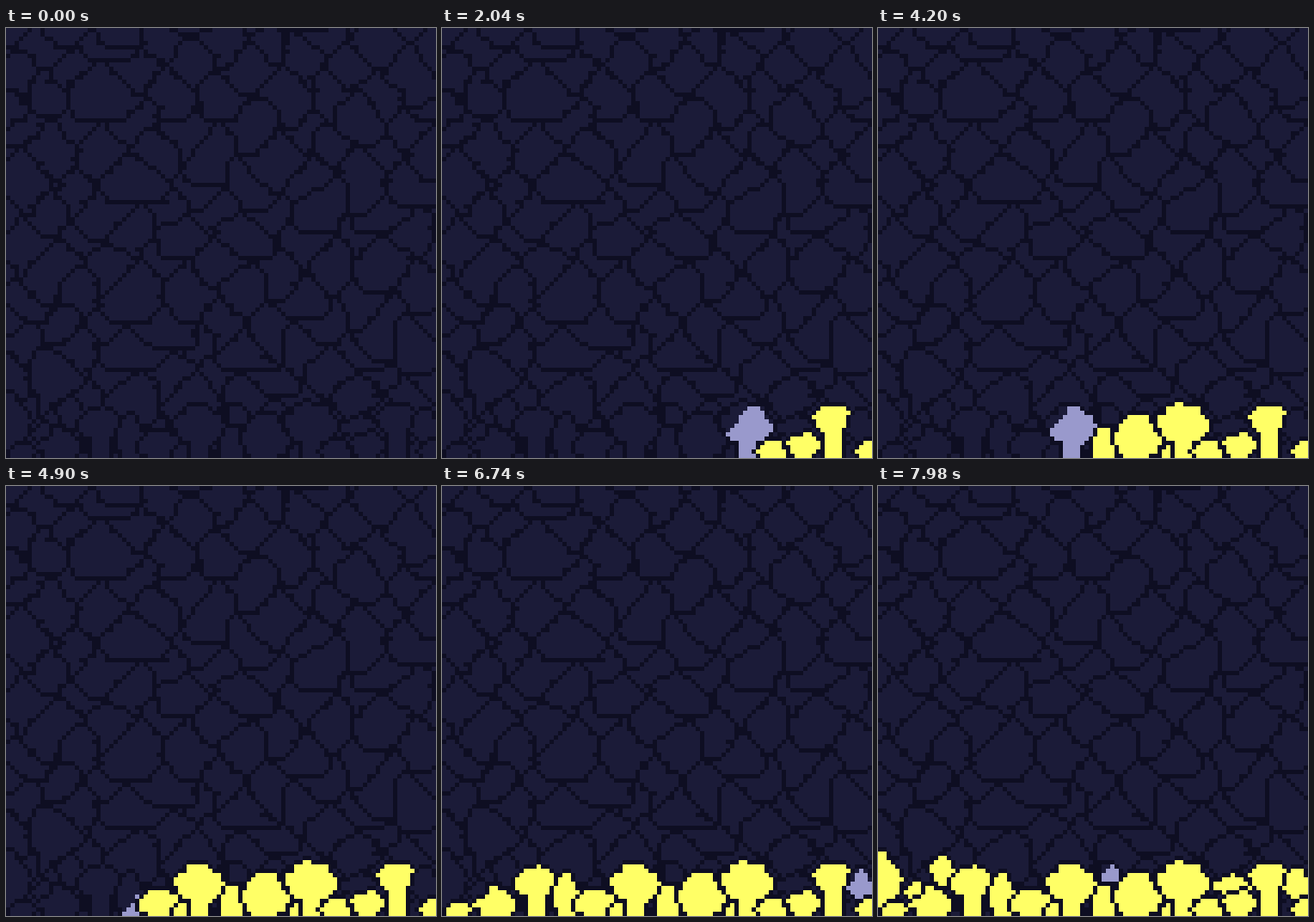
Recreate the animation shown at these times as an HTML page with a canvas. Size 500 by 500 pixels, loop 8 s.

```html
<!DOCTYPE html>
<html lang="en">
<head>
<meta charset="utf-8">
<title>Cave flood fill</title>
<style>
  html, body { margin: 0; width: 100%; height: 100%; overflow: hidden; background: #1b1b38; }
  canvas { display: block; width: 100%; height: 100%; image-rendering: pixelated; }
</style>
</head>
<body>
<canvas id="stage" width="100" height="100"></canvas>
<script>
const SIZE = 100, STEP = 20, LOOP = 8000;
const FLOOR = '#1b1b38', WALL = '#0e0e22', ACTIVE = '#9999cc', DONE = '#ffff66';

// Chambers as rounded diamonds in fill order: middle x, y and half width, half height.
const rooted = [ // these stand on the bottom edge
  [99, 98.5, 2.5, 2.5], [90.8, 91.2, 5, 3.8], [84, 97, 4, 3.2], [77, 98.5, 4, 2.7],
  [70.8, 92, 6.5, 4.9], [68, 99, 2, 2], [60.5, 95.3, 5.7, 5.5], [52.5, 96.5, 2.3, 4],
  [45, 92.7, 6, 4.9], [41, 98.5, 2.2, 2], [35.5, 97, 4.8, 3.6], [28.8, 94.8, 3, 5],
  [21.8, 92.3, 5.2, 4], [12.5, 97, 4.9, 4], [4, 98.6, 3.2, 2]
];
const hanging = [
  [97.3, 92.7, 3, 4], [82.5, 93, 4.5, 2.5], [0, 92, 5.5, 7],
  [9.3, 94.5, 2.8, 2.2], [15, 89.5, 2.7, 3.7], [54, 90, 2.5, 2.3]
];
const STEM = 2.2;

let seed = 7;
const random = () => {
  seed = (Math.imul(seed, 1664525) + 1013904223) >>> 0;
  return seed / 4294967296;
};
const spread = amount => (random() - 0.5) * 2 * amount;

function makeCanvas() {
  const canvas = document.createElement('canvas');
  canvas.width = canvas.height = SIZE;
  return canvas.getContext('2d');
}
const ctx = document.getElementById('stage').getContext('2d');
const rock = makeCanvas();
const paint = (target, color, x, y) => {
  target.fillStyle = color;
  target.fillRect(x, y, 1, 1);
};

// Cracks run diagonally between the shaken nodes of a diamond lattice.
function crack([x, y], [endX, endY]) {
  while (x !== endX || y !== endY) {
    paint(rock, WALL, x, y);
    if (random() < 0.2) paint(rock, WALL, x + (random() < 0.5 ? 1 : -1), y);
    const sidestep = random();
    if (sidestep > 0.12 || y === endY) x += Math.sign(endX - x);
    if (sidestep < 0.88 || x === endX) y += Math.sign(endY - y);
  }
}

function drawCracks() {
  const gap = 6.5, count = 18;
  const nodes = Array.from({ length: count }, (_, row) =>
    Array.from({ length: count }, (_, col) => [
      Math.round((col - 0.5) * gap + spread(2.8)),
      Math.round((row - 0.5) * gap + spread(2.8))
    ]));
  for (let row = 0; row < count - 1; row++) {
    for (let col = row % 2; col < count; col += 2) {
      for (const side of [-1, 1]) {
        const next = nodes[row + 1][col + side];
        if (next) crack(nodes[row][col], next);
      }
    }
  }
}

function findOwner(x, y) {
  const ragged = 1 + spread(0.1);
  let owner = -1, best = ragged;
  [...rooted, ...hanging].forEach(([cx, cy, rx, ry], i) => {
    const dx = Math.abs(x + 0.5 - cx), dy = Math.abs(y + 0.5 - cy);
    const onStem = i < rooted.length && y > cy && dx < STEM;
    const depth = onStem ? 0.9 * dx / STEM : (dx / rx) ** 1.5 + (dy / ry) ** 1.5;
    if (depth < best) { best = depth; owner = i; }
  });
  return owner;
}

// Returns the cells of every chamber, and walls off each chamber in the rock.
function carveChambers() {
  const owners = Array.from({ length: SIZE }, (_, y) =>
    Array.from({ length: SIZE }, (_, x) => findOwner(x, y)));
  const at = (x, y) => owners[y]?.[x] ?? -1;
  const chambers = [...rooted, ...hanging].map(() => []);

  for (let y = 0; y < SIZE; y++) {
    for (let x = 0; x < SIZE; x++) {
      const own = at(x, y);
      const meets = (nx, ny) => at(nx, ny) >= 0 && at(nx, ny) !== own;
      const shared = meets(x + 1, y) || meets(x, y + 1);
      if (own >= 0 && !shared) {
        chambers[own].push([x, y]);
        paint(rock, FLOOR, x, y);
      } else if (shared || meets(x - 1, y) || meets(x, y - 1)) {
        paint(rock, WALL, x, y);
      }
    }
  }
  // Each flood spreads from the rightmost cell of its lowest row.
  for (const cells of chambers) {
    const [sx, sy] = cells[cells.length - 1];
    const reach = ([x, y]) => Math.abs(x - sx) + Math.abs(y - sy);
    cells.sort((a, b) => reach(a) - reach(b));
  }
  return chambers;
}

rock.fillStyle = FLOOR;
rock.fillRect(0, 0, SIZE, SIZE);
drawCracks();
const chambers = carveChambers();
const total = chambers.flat().length;

function draw(time) {
  const progress = Math.floor(time % LOOP / STEP) * STEP / LOOP;
  let left = Math.floor(progress * total);
  ctx.drawImage(rock.canvas, 0, 0);
  for (const cells of chambers) {
    const color = left >= cells.length ? DONE : ACTIVE;
    for (const [x, y] of cells.slice(0, left)) paint(ctx, color, x, y);
    left = Math.max(0, left - cells.length);
  }
}

const began = performance.now();
function frame() {
  draw(performance.now() - began);
  requestAnimationFrame(frame);
}
frame();
</script>
</body>
</html>
```
